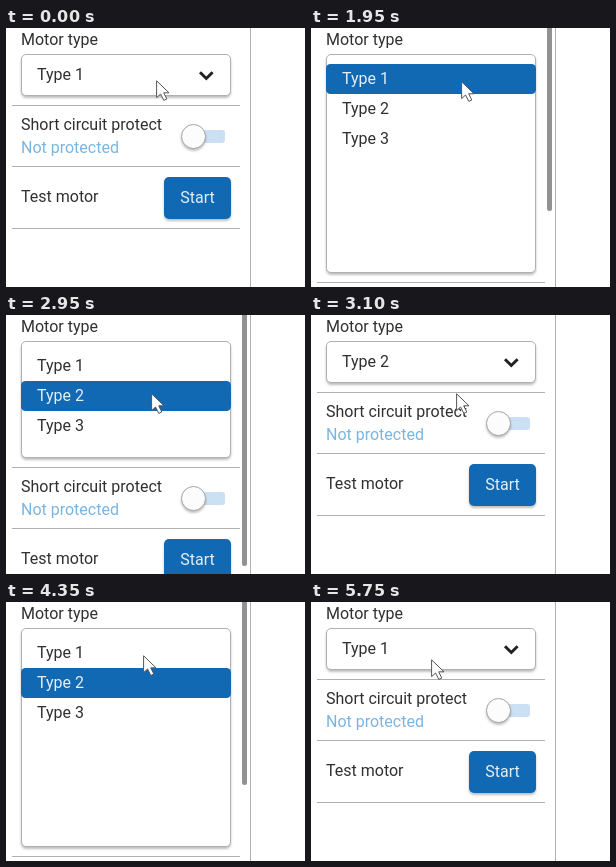
An HTML page for the animation above (6.8 s loop, 299 by 259 pixels).

```html
<!DOCTYPE html>
<html lang="en">
<head>
<meta charset="utf-8">
<title>Motor settings</title>
<style>
  html, body { margin: 0; width: 100%; height: 100%; overflow: hidden; background: #fff; }
  svg { display: block; width: 299px; height: 259px; }
  text { font: 16px Roboto, sans-serif; fill: #303030; }
  .rule { stroke: #b0b0b0; }
  .light { fill: #e4eef7; }
  .raised { filter: drop-shadow(0 2px 1px rgba(0, 0, 0, .25)); }
</style>
</head>
<body>
<svg viewBox="0 0 299 259">
  <defs>
    <clipPath id="window"><rect id="windowRect" x="15" y="27" width="210" height="66"/></clipPath>
  </defs>
  <path class="rule" d="M244.5 0V259"/>
  <text x="15" y="17">Motor type</text>
  <rect id="box" class="raised" x="15.5" y="26.5" width="209" height="41" rx="4.5" fill="#fff" stroke="#b0b0b0"/>

  <g id="closed">
    <text id="value" x="31" y="52">Type 1</text>
    <path d="M194 44.2l6.3 6.3 6.3-6.3" fill="none" stroke="#222" stroke-width="3"/>
  </g>
  <g id="open" clip-path="url(#window)">
    <g id="items">
      <rect id="mark" x="15" y="36" width="210" height="30" rx="4.5" fill="#1269b3"/>
      <text class="item" x="31" y="56">Type 1</text>
      <text class="item" x="31" y="86">Type 2</text>
      <text class="item" x="31" y="116">Type 3</text>
    </g>
  </g>

  <g id="below">
    <path class="rule" d="M6 77.5H234M6 138.5H234M6 200.5H234"/>
    <text x="15" y="102">Short circuit protect</text>
    <text x="15" y="125" style="fill:#7ab5e2">Not protected</text>
    <rect x="180" y="102" width="39" height="13" rx="3" fill="#cbe0f3"/>
    <circle class="raised" cx="187.5" cy="108.5" r="12" fill="#fcfcfc" stroke="#a4a4a4"/>
    <text x="15" y="174">Test motor</text>
    <rect class="raised" x="158" y="149" width="67" height="42" rx="5" fill="#1269b3"/>
    <text class="light" x="191.5" y="175" text-anchor="middle">Start</text>
  </g>
  <rect id="scrollbar" x="236" y="-6" width="5" height="189" rx="2.5" fill="#929292"/>
  <path id="cursor" d="M.6 .8V17.6L4.6 14 7.8 20.4 10.8 19 7.7 12.8H13Z" fill="#fff" stroke-linejoin="round"/>
</svg>
<script>
const $ = id => document.getElementById(id);
const LOOP = 6800, STEP = 50;
const CLOSED = 42, PEEK = 68, FULL = 219;

// Dropdown height: start, end, from, to, ease-out power
const heights = [
  [1250, 1250, PEEK, PEEK, 1],
  [1500, 1500, FULL, FULL, 1],
  [2900, 3100, FULL, CLOSED, 3],
  [4150, 4350, PEEK, FULL, 3],
  [5550, 5750, FULL, CLOSED, 4]
];
// Pointer moves: start, end, from, to
const moves = [
  [0, 0, [150, 52], [150, 52]],
  [1900, 2500, [150, 52], [145, 78]],
  [3350, 3750, [145, 78], [137, 53]],
  [4750, 5000, [137, 53], [120, 57]]
];
const presses = [[1250, 1500], [2850, 2950], [4150, 4350], [5350, 5600]];

const mix = (a, b, p) => a + (b - a) * p;
const progress = (t, a, b) => b > a ? Math.min(1, (t - a) / (b - a)) : 1;
const current = (list, t) => list.filter(entry => entry[0] <= t).pop();

function heightAt(t) {
  const segment = current(heights, t);
  if (!segment) return CLOSED;
  const [start, end, from, to, power] = segment;
  return Math.round(mix(from, to, 1 - (1 - progress(t, start, end)) ** power));
}

function pointerAt(t) {
  const [start, end, from, to] = current(moves, t);
  const p = progress(t, start, end);
  const eased = mix(p, p * p * (3 - 2 * p), .5);
  return from.map((v, i) => Math.round(mix(v, to[i], eased)));
}

function draw(t) {
  const height = heightAt(t), shift = height - CLOSED, isOpen = shift > 0;
  const selected = t >= 2950 && t < 5600 ? 1 : 0;

  $('box').setAttribute('height', height - 1);
  $('windowRect').setAttribute('height', height - 2);
  $('closed').style.display = isOpen ? 'none' : '';
  $('open').style.display = isOpen ? '' : 'none';
  $('value').textContent = `Type ${selected + 1}`;

  // Keep the selected row centred while the list is short
  const scroll = Math.max(0, Math.round(25 + selected * 30 - height / 2));
  $('items').setAttribute('transform', `translate(0 ${-scroll})`);
  $('mark').setAttribute('y', 36 + selected * 30);
  document.querySelectorAll('.item').forEach((item, i) => item.classList.toggle('light', i === selected));

  $('below').setAttribute('transform', `translate(0 ${shift})`);
  $('scrollbar').style.display = shift > 58 ? '' : 'none';
  $('scrollbar').setAttribute('height', 6 + 183 * 377 / (200 + shift));

  const pressed = presses.some(([a, b]) => t >= a && t < b);
  const cursor = $('cursor');
  cursor.setAttribute('transform', `translate(${pointerAt(t)})`);
  cursor.setAttribute('stroke', pressed ? '#111' : '#555');
  cursor.setAttribute('stroke-width', pressed ? 1.4 : 1);
}

const origin = performance.now();
function tick() {
  const t = (performance.now() - origin) % LOOP;
  draw(Math.floor(t / STEP) * STEP);
  requestAnimationFrame(tick);
}
tick();
</script>
</body>
</html>
```
